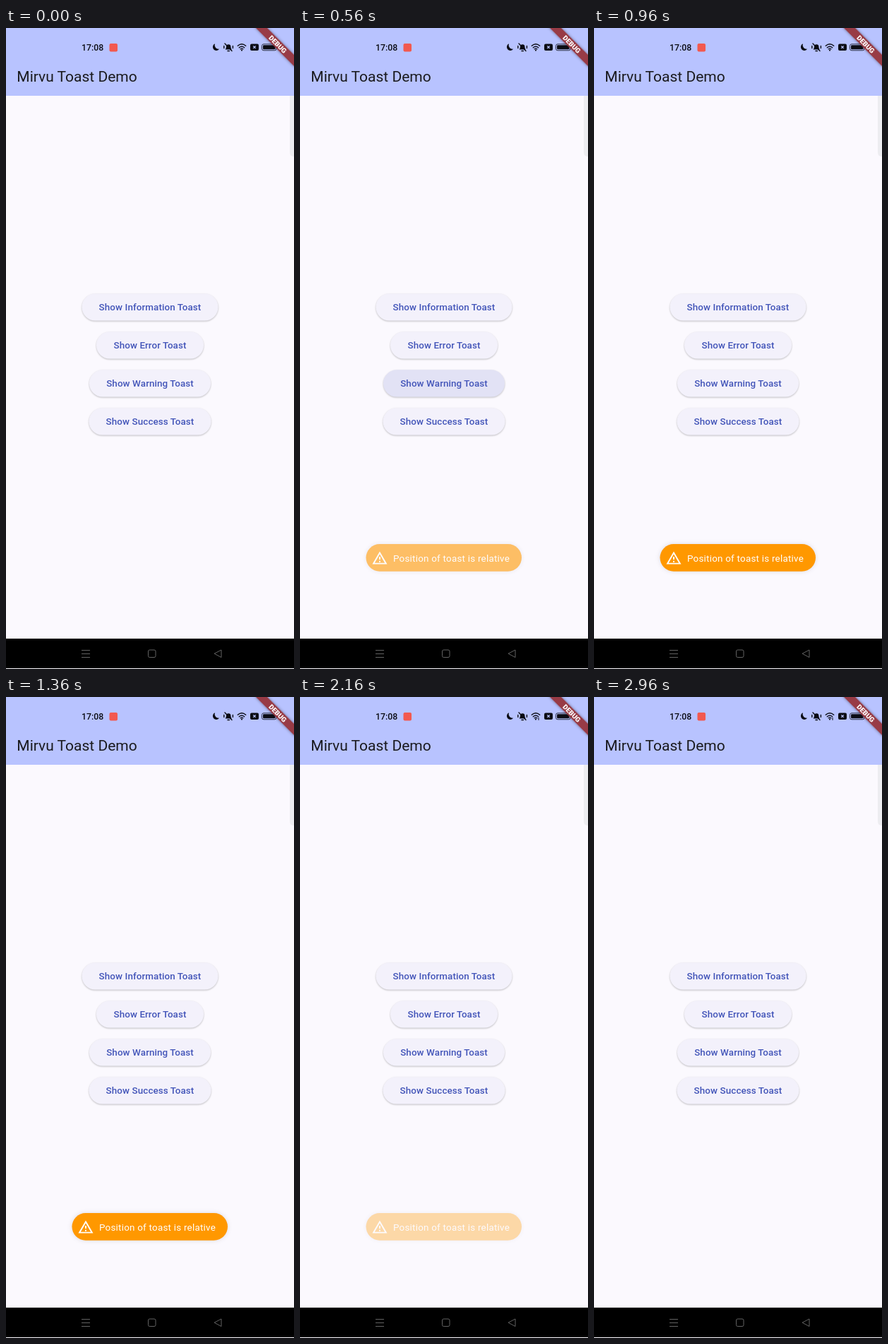
These frames come from a looping animation (408 px wide and 908 px high, 3.12 s). An HTML page:

```html
<!DOCTYPE html>
<html lang="en">
<head>
<meta charset="utf-8">
<title>Toast demo</title>
<style>
  html, body { margin: 0; width: 100%; height: 100%; overflow: hidden; background: #fbf9fe; }
  svg { display: block; width: 408px; height: 908px; font-family: Roboto, sans-serif; }
  .button { fill: #f3f1fb; filter: drop-shadow(0 1px 1px rgba(0, 0, 0, .24)); }
  .label { font-size: 13.4px; font-weight: 500; letter-spacing: .1px; fill: #4355b9; text-anchor: middle; }
  .toast { fill: #ff9800; filter: drop-shadow(0 0 3px rgba(40, 40, 70, .15)); }
  .ribbon { fill: #983b46; filter: drop-shadow(0 0 2px rgba(0, 0, 0, .4)); }
  .line { fill: none; stroke: #0b0c14; stroke-width: 1.4; stroke-linecap: round; }
</style>
</head>
<body>
<svg viewBox="0 0 408 908">
  <rect width="408" height="908" fill="#fbf9fe"/>
  <rect width="408" height="96" fill="#b8c3ff"/>
  <path d="M408 96h-6v80q0 6 6 6z" fill="#ededf1"/>
  <text x="15.3" y="76" font-size="21" fill="#1b1b1f">Mirvu Toast Demo</text>

  <!-- status bar -->
  <text x="107" y="31.7" font-size="12.3" font-weight="500" fill="#0b0c14">17:08</text>
  <rect x="146.5" y="22" width="11.5" height="11.5" rx="2" fill="#f2594f"/>
  <path d="M296 22.3a5 5 0 1 0 6.2 7.2a5.3 5.3 0 0 1-6.2-7.2z" fill="#0b0c14"/>
  <path d="M310.5 30.5q1.5-1.5 1.5-4a3.2 3.2 0 0 1 6.4 0q0 2.500 1.500 4z" fill="#0b0c14"/>
  <path class="line" stroke-width="1" d="M310 22l10 10.500M314 32.500h2.400M308.800 25.500v3M321.400 25.500v3"/>
  <path class="line" d="M328.300 25.300q5.700-5 11.400 0M330.300 27.700q3.700-3 7.400 0M332.200 29.800q1.800-1.300 3.600 0"/>
  <circle cx="334" cy="31.6" r="1.1" fill="#0b0c14"/>
  <path id="traffic" class="line" style="stroke-width:1" d="M338 29.500v3"/>
  <rect x="346" y="22.500" width="12" height="9.500" rx="2" fill="#0b0c14"/>
  <path d="M350.300 25.500l3.400 3.400m0-3.400l-3.400 3.400" stroke="#b8c3ff" stroke-width="1.200"/>
  <rect x="362.500" y="22.800" width="20.500" height="9" rx="2.500" fill="none" stroke="#0b0c14" stroke-width=".8"/>
  <rect x="364" y="24.300" width="17.500" height="6" rx="1.300" fill="#0b0c14"/>

  <!-- corner ribbon -->
  <g transform="translate(408) rotate(45)">
    <rect class="ribbon" x="-40" y="26.8" width="80" height="11.4"/>
    <text y="36" font-size="9.75" font-weight="900" fill="#fff" text-anchor="middle">DEBUG</text>
  </g>

  <g id="buttons"></g>

  <g id="toast">
    <rect class="toast" x="93.500" y="731" width="220.500" height="38.700" rx="19.350"/>
    <path transform="translate(101.500 739.500) scale(.956)" fill="#fff"
      d="M12 5.990L19.530 19H4.470L12 5.990M12 2L1 21h22L12 2zM13 16h-2v2h2zM13 10h-2v4h2z"/>
    <text x="132" y="755.600" font-size="13.38" letter-spacing=".24" fill="#fff">Position of toast is relative</text>
  </g>

  <!-- navigation bar -->
  <rect y="863.500" width="408" height="2" fill="#f0eff2"/>
  <rect y="865" width="408" height="42" fill="#000"/>
  <g fill="none" stroke="#626262">
    <path d="M107 881.500h12M107 886.500h12M107 891.500h12"/>
    <rect x="201.500" y="881" width="10.500" height="10.500" rx="2"/>
    <path d="M305 881v10.500L295 886.250z" stroke-linejoin="round"/>
  </g>
</svg>
<script>
  const LOOP = 3120, TICK = 80;
  const byId = id => document.getElementById(id);
  const clamp = v => Math.max(0, Math.min(1, v));

  const buttons = [["Information", 193], ["Error", 152], ["Warning", 172], ["Success", 173]];
  byId("buttons").innerHTML = buttons.map(([kind, width], i) => {
    const y = 376.3 + 54 * i;
    const shape = `x="${204 - width / 2}" y="${y}" width="${width}" height="38.3" rx="19.15"`;
    const ripple = kind === "Warning" ? `<rect id="ripple" ${shape} fill="#4355b9"/>` : "";
    return `<rect class="button" ${shape}/>${ripple}
      <text class="label" x="204" y="${y + 24}">Show ${kind} Toast</text>`;
  }).join("");

  // Every fifth tick repeats the picture before it.
  function stepAt(time) {
    const tick = Math.floor(time / TICK);
    return tick - Math.floor((tick + 2) / 5);
  }

  function draw(now) {
    const step = stepAt(now % LOOP);
    const fadeIn = clamp((step - 3) * 0.2);
    const fadeOut = clamp(0.9 - (step - 19) * 0.187);
    byId("toast").setAttribute("opacity", Math.min(fadeIn, fadeOut));
    const press = Math.min(clamp(step - 3), clamp((9 - step) / 3));
    byId("ripple").setAttribute("opacity", 0.095 * press);
    byId("traffic").setAttribute("opacity", step >= 15 ? 1 : 0);
    requestAnimationFrame(() => draw(performance.now()));
  }
  draw(0);
</script>
</body>
</html>
```
